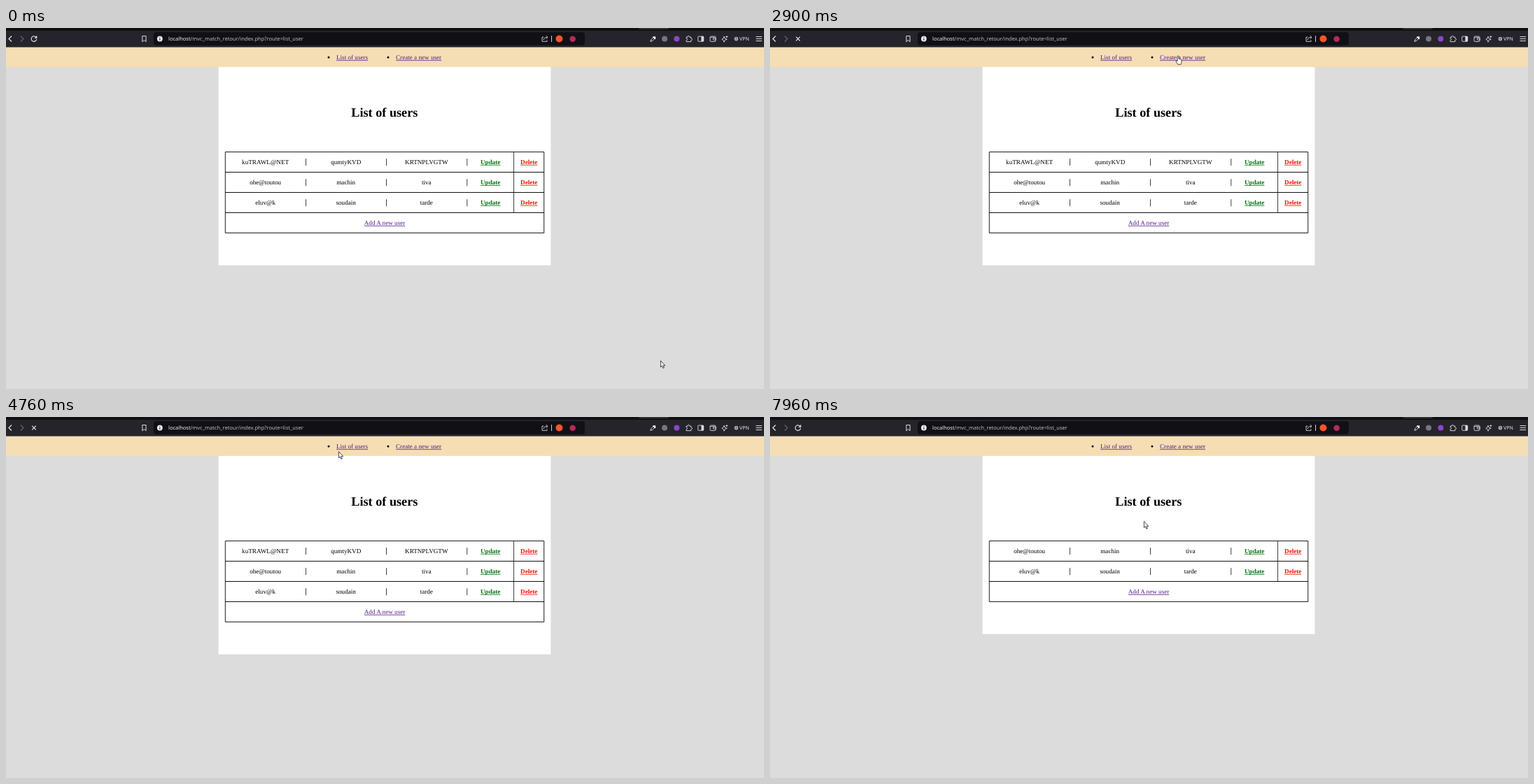
An HTML page with a canvas for the animation above (8000 ms loop, 1083 by 517 pixels).

```html
<!DOCTYPE html>
<html lang="en">
<head>
<meta charset="utf-8">
<title>User manager</title>
<style>
  html, body { margin: 0; width: 100%; height: 100%; overflow: hidden; background: #dcdcdc; }
  canvas { display: block; }
</style>
</head>
<body>
<canvas id="stage" width="1083" height="517"></canvas>
<script>
const ctx = document.getElementById('stage').getContext('2d');
ctx.textRendering = 'geometricPrecision';

const LOOP = 8000;
const STEP = 67;
const SERIF = '"Liberation Serif", serif';
const UI = '"Open Sans", sans-serif';
const VISITED = '#551a8b';
const BODY = '9.13px ' + SERIF;
const BOLD = 'bold 9.13px ' + SERIF;

const USERS = [
  ['kuTRAWL@NET', 'qumtyKVD', 'KRTNPLVGTW'],
  ['ohe@toutou', 'machin', 'tiva'],
  ['eluv@k', 'soudain', 'tarde']
];

// Pointer path: time, x, y
const PATH = [
  [0, 935, 476], [190, 681, 410], [520, 681, 410], [590, 688, 411],
  [800, 655, 345], [1080, 545, 140], [1330, 480, 43], [1400, 484, 40],
  [1470, 484, 39], [2060, 484, 39], [2130, 499, 40], [2270, 583, 40],
  [2970, 583, 40], [3230, 588, 77], [3300, 588, 76], [3370, 588, 76],
  [3620, 430, 160], [3800, 337, 189], [3930, 360, 184], [4070, 439, 127],
  [4200, 461, 57], [4340, 510, 32], [4540, 484, 43], [4680, 484, 43],
  [4760, 475, 49], [4880, 475, 49], [5230, 600, 150], [5480, 702, 203],
  [5900, 751, 193], [6500, 751, 193], [6820, 600, 180], [6880, 600, 180],
  [7250, 438, 130], [7480, 480, 80], [7700, 540, 53], [7760, 542, 47],
  [7960, 534, 149], [LOOP, 534, 149]
];

const LOADING = [[2480, 3160], [4680, 5130], [6100, 6750]];

function rect(x, y, w, h, color) {
  ctx.fillStyle = color;
  ctx.fillRect(x, y, w, h);
}

function box(x, y, w, h, r, fill, stroke, width = 0.9) {
  ctx.beginPath();
  ctx.roundRect(x, y, w, h, r);
  if (fill) { ctx.fillStyle = fill; ctx.fill(); }
  if (stroke) { ctx.strokeStyle = stroke; ctx.lineWidth = width; ctx.stroke(); }
}

function disc(x, y, r, color) {
  ctx.beginPath();
  ctx.arc(x, y, r, 0, Math.PI * 2);
  ctx.fillStyle = color;
  ctx.fill();
}

function trace(d, color, width = 1) {
  ctx.strokeStyle = color;
  ctx.lineWidth = width;
  ctx.stroke(new Path2D(d));
}

function text(str, x, y, font, color, align = 'left') {
  ctx.font = font;
  ctx.fillStyle = color;
  ctx.textAlign = align;
  ctx.fillText(str, x, y);
  return ctx.measureText(str).width;
}

function link(str, x, y, font, color, align = 'left') {
  const w = text(str, x, y, font, color, align);
  rect(align === 'center' ? x - w / 2 : x, y + 0.9, w, 0.75, color);
}

function navIcons(loading) {
  const ink = '#f0f0f2';
  trace('M8 11.5L4 15.5L8 19.5', ink, 1.1);
  trace('M21 11.5L25 15.5L21 19.5', '#66656b', 1.1);
  if (loading) {
    trace('M37.2 12.7L42.8 18.3M42.8 12.7L37.2 18.3', ink, 1.1);
  } else {
    trace('M43.2 13.6A3.8 3.8 0 1 0 43.7 16M43.8 11.2V14.2H40.8', ink, 1.1);
  }
  trace('M194.8 11.5H200V19.7L197.4 17.4L194.8 19.7Z', '#dcdce0', 1);
}

function toolIcons() {
  const ink = '#dedee2';
  // eyedropper
  trace('M920.8 19.2L921.6 16.8L925.4 13L927.2 14.8L923.4 18.6Z', ink, 1);
  trace('M924.5 12.3L928 15.6M926.4 13.8L927.8 12.3', '#fff', 1.8);
  disc(941, 15.5, 4, '#77767d');
  disc(958.3, 15.5, 4, '#8e45c9');
  // puzzle piece
  trace('M972 13H974.2C973.6 10.6 977 10.6 976.4 13H978.8V15C981 14.6 981 18 978.8 17.4V19.6H972V17.4C974 17.6 974 14.9 972 15.1Z', ink, 0.9);
  // side panel
  box(988.7, 12, 8, 7.2, 1, null, ink);
  rect(993.4, 12, 3.3, 7.2, ink);
  // wallet
  box(1006, 12, 8, 7.4, 1.4, null, ink);
  box(1010.4, 14.4, 3.8, 2.6, 0.5, null, ink);
  trace('M1006 13.6H1013', ink, 0.7);
  // sparkle
  trace('M1026 12L1027.2 15L1030.2 16.2L1027.2 17.4L1026 20.2L1024.8 17.4L1022.8 16.2L1024.8 15ZM1029.8 11V14M1028.3 12.5H1031.3', ink, 0.9);
  disc(1043.4, 15.6, 2.8, '#b9b9bf');
  trace('M1040.8 15.6H1046M1043.4 13V18.2', '#3a393f', 0.5);
  text('VPN', 1048, 18.2, '7.1px ' + UI, '#f0f0f2');
  trace('M1071.5 12.5H1080M1071.5 15.5H1080M1071.5 18.5H1080', ink, 1);
}

function browserBar(route, loading) {
  rect(0, 0, 1083, 27.5, '#25242a');
  rect(0, 0, 1083, 4, '#101014');
  box(904, -4, 43, 6, 2, '#303036');
  navIcons(loading);
  box(211, 6, 616, 18.7, 4, '#111115');
  disc(219.8, 15.5, 3.9, '#eeeef1');
  rect(219.3, 15, 1, 2.8, '#111115');
  rect(219.3, 13.1, 1, 1, '#111115');
  const font = '7.54px ' + UI;
  const w = text('localhost', 232, 18.2, font, '#fff');
  text('/mvc_match_retour/index.php?route=' + route, 232 + w, 18.2, font, '#c6c6ca');
  // share
  trace('M768.3 13H766V19.3H773V17.3M768.2 17C768.5 14.5 770 13.3 773.6 13.3M771.7 11L774 13.3L771.7 15.6', '#d8d8dc', 0.9);
  rect(779, 11, 0.9, 9, '#e4e4e8');
  disc(790.4, 15.5, 5, '#f4552c');
  disc(809.6, 15.7, 4.3, '#b52a5c');
  toolIcons();
}

function siteNav() {
  rect(0, 27.4, 1083, 28.4, '#f5deb3');
  disc(461, 42.1, 1.5, '#000');
  disc(546, 42.1, 1.5, '#000');
  link('List of users', 472, 45, BODY, VISITED);
  link('Create a new user', 557, 45, BODY, VISITED);
}

function panel(bottom, title) {
  rect(303.6, 55.8, 474.8, bottom - 55.8, '#fff');
  text(title, 540.8, 127.3, 'bold 18.22px ' + SERIF, '#000', 'center');
}

function listPage(users) {
  const row = 29.1, top = 177.6, right = 769;
  const end = top + row * users.length;
  panel(252.6 + row * users.length, 'List of users');
  users.forEach((user, i) => {
    const y = top + row * i, base = y + 17.4;
    user.forEach((value, j) => {
      text(value, 370.6 + j * 115.1, base, BODY, '#000', 'center');
      rect(428 + j * 115.2, y + 9.5, 0.8, 10, '#111');
    });
    link('Update', 692.2, base, BOLD, '#007311', 'center');
    link('Delete', 747.2, base, BOLD, '#f01408', 'center');
    rect(313, Math.round(y + row) - 1, right - 313, 1, '#111');
  });
  rect(725.2, top, 0.8, end - top, '#111');
  box(313.3, 177.5, right - 313.6, Math.round(end + row) - 178, 0, null, '#111', 0.95);
  link('Add A new user', 541, end + 17.4, BODY, VISITED, 'center');
}

function formPage() {
  panel(270.8, 'Create and add a user to the dataBase');
  [['Email', 337], ['First Name', 356.4], ['Last Name', 355.2]].forEach(([label, x], i) => {
    text(label, 312.5, 186.3 + i * 12, BODY, '#000');
    box(x, 177.6 + i * 12, 100.6, 11.4, 0.6, '#fff', '#707070');
  });
  box(313, 213.6, 31.6, 11.2, 1.6, '#efefef', '#707070');
  text('Create', 328.8, 222, '7.6px "Liberation Sans", sans-serif', '#000', 'center');
}

function pointerAt(t) {
  const i = Math.max(1, PATH.findIndex(p => p[0] > t));
  const [t0, x0, y0] = PATH[i - 1], [t1, x1, y1] = PATH[i];
  const k = Math.floor((t - t0) / STEP) * STEP / (t1 - t0);
  return [x0 + (x1 - x0) * k, y0 + (y1 - y0) * k];
}

function overLink(x, y, isList) {
  const inside = (l, r, top, bottom) => x >= l && x <= r && y >= top && y <= bottom;
  return inside(472, 517, 36, 47) || inside(557, 622, 36, 47) ||
    (isList && (inside(735, 760, 187, 198) || inside(678, 706, 187, 198)));
}

const ARROW = new Path2D('M.4 .5V9.6L2.4 7.8L3.9 11.2L5.4 10.5L4 7.3H6.7Z');
const HAND = new Path2D('M-1 7V.8C-1-.5 1-.5 1 .8V4.3C1.5 3.8 2.4 4 2.5 4.7C3 4.3 3.8 4.5 3.9 5.1C4.5 4.9 5 5.2 5 5.8V8.6C5 10.2 4 10.8 4 12.2H-.4C-.6 10.6-2.4 9.6-2.9 7.5C-3 6.4-1.7 6.2-1 7.4Z');

function pointer(t, isList) {
  const [x, y] = pointerAt(t);
  const shape = overLink(x, y, isList) ? HAND : ARROW;
  ctx.save();
  ctx.translate(x, y);
  ctx.fillStyle = '#fff';
  ctx.strokeStyle = '#1a1a1a';
  ctx.lineWidth = 0.8;
  ctx.fill(shape);
  ctx.stroke(shape);
  ctx.restore();
}

function draw(t) {
  const isList = t < 2970 || t >= 4740;
  const loading = LOADING.some(([from, to]) => t >= from && t < to);
  rect(0, 0, 1083, 517, '#dcdcdc');
  siteNav();
  if (isList) listPage(t < 6500 ? USERS : USERS.slice(1));
  else formPage();
  browserBar(isList ? 'list_user' : 'create_user_form', loading);
  pointer(t, isList);
}

const start = performance.now();
function frame() {
  draw((performance.now() - start) % LOOP);
  requestAnimationFrame(frame);
}
frame();
</script>
</body>
</html>
```
